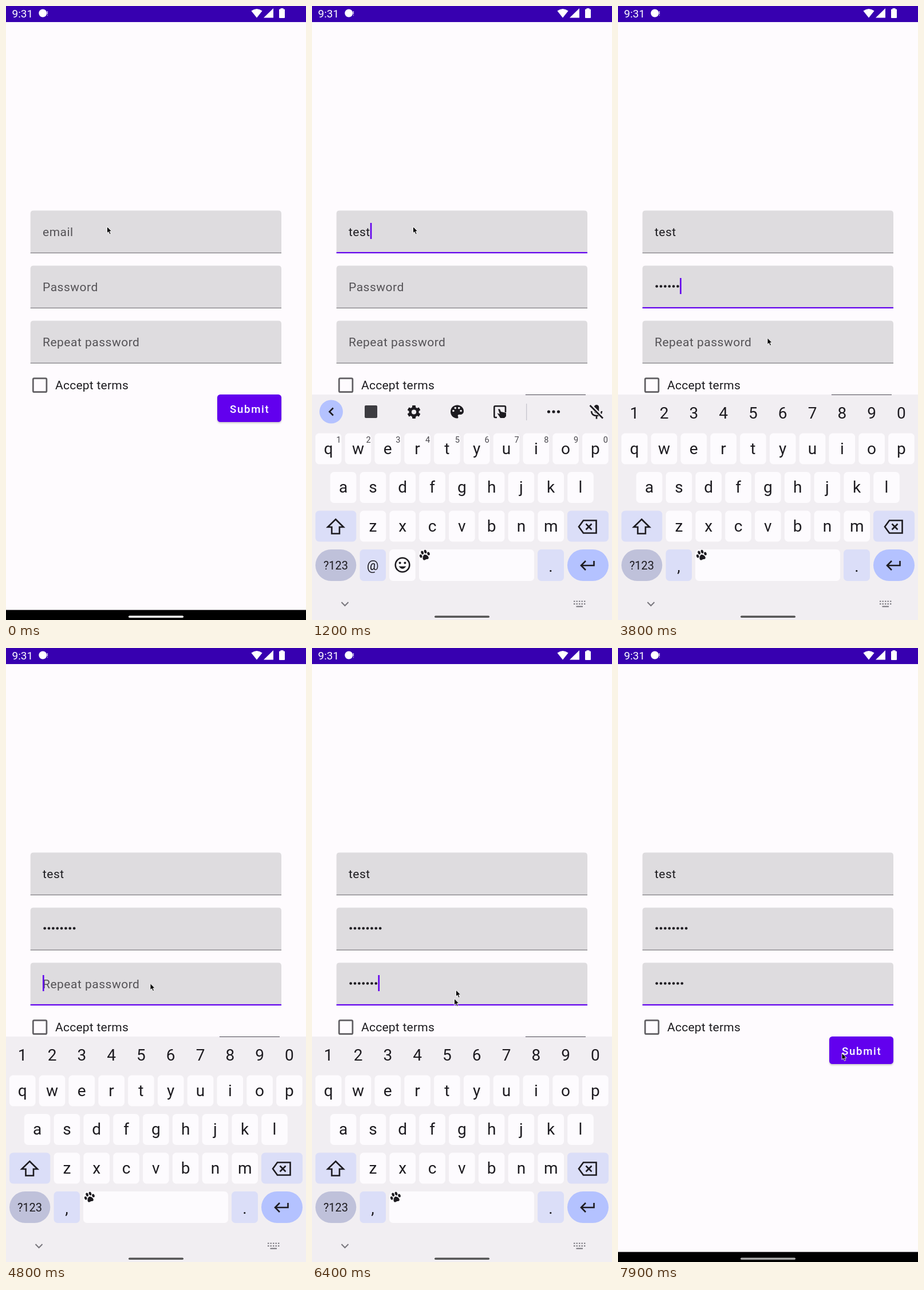
Write an HTML page that moves like this. It is 524 px wide and 1070 px high and loops after 8 s.

```html
<!DOCTYPE html>
<html lang="en">
<head>
<meta charset="utf-8">
<title>Sign-up form</title>
<style>
html, body { margin: 0; width: 100%; height: 100%; overflow: hidden; background: #fefbfe; }
svg { display: block; width: 524px; height: 1070px; font-family: Roboto, "Noto Sans", sans-serif; }
.body { font-size: 21px; letter-spacing: .5px; fill: #1c1b1f; }
.label { font-size: 21px; letter-spacing: .25px; fill: #1c1b1f; }
.hint { fill: #545256; }
.key { font-size: 28px; text-anchor: middle; fill: #1d1b20; }
.line { fill: none; stroke: #1d1b20; stroke-width: 2.6; }
.nav { fill: none; stroke: #77757c; stroke-width: 2; }
</style>
</head>
<body>
<svg id="stage" viewBox="0 0 524 1070"></svg>
<script>
const LOOP = 8000, STEP = 100;
const INK = '#1d1b20', SOFT = '#dbdef8', BLUE = '#b4c2ff', PURPLE = '#6200ee';
const stage = document.getElementById('stage');
const $ = id => document.getElementById(id);

const rect = (x, y, w, h, fill, r = 0, more = '') =>
  `<rect x="${x}" y="${y}" width="${w}" height="${h}" rx="${r}" fill="${fill}" ${more}/>`;
const text = (x, y, cls, str, more = '') => `<text x="${x}" y="${y}" class="${cls}" ${more}>${str}</text>`;
const path = (d, cls = 'line', more = '') => `<path d="${d}" class="${cls}" ${more}/>`;
const dot = (x, y, r, fill = INK) => `<circle cx="${x}" cy="${y}" r="${r}" fill="${fill}"/>`;

const statusBar = () => rect(0, 0, 524, 28, '#3700b0') +
  text(10.5, 20, '', '9:31', 'font-size="19" fill="#fff"') +
  dot(64.3, 12.5, 7, '#fff') +
  text(71, 16.5, '', '!', 'font-size="11" fill="#fff"') +
  '<g fill="#fff"><path d="M438 20.5L428.4 8.6Q438 1.2 447.6 8.6Z"/><path d="M467 4V20.5H450Z"/>' +
  '<path d="M479.5 5.5V4H484.5V5.5H486Q487 5.5 487 6.5V20Q487 21 486 21H478Q477 21 477 20V6.5Q477 5.5 478 5.5Z"/></g>';

// One filled text field: box, hint, value, underline
const hints = ['email', 'Password', 'Repeat password'];
const fieldTop = i => 356.5 + 96 * i;
const field = (hint, i) => {
  const y = fieldTop(i);
  return `<path d="M42.7 ${y + 74.5}V${y + 5.3}q0-5.3 5.3-5.3H475.7q5.3 0 5.3 5.3V${y + 74.5}Z" fill="#dedcdf"/>` +
    text(64, y + 44, 'body hint', hint, `id="hint${i}"`) +
    `<g id="value${i}"></g>` +
    rect(42.7, y + 73.2, 438.3, 1.3, '#858387', 0, `id="under${i}"`);
};

const form = () => hints.map(field).join('') +
  rect(47.3, 648.8, 23.6, 23.9, 'none', 2, 'stroke="#605e62" stroke-width="2.7"') +
  text(86, 668, 'label', 'Accept terms') +
  rect(369, 679, 112, 48, '#000', 5.3, 'opacity=".2" filter="url(#blur)"') +
  rect(369, 677, 112, 48, PURPLE, 5.3) +
  text(391, 709, '', 'Submit', 'font-size="18.67" font-weight="500" letter-spacing="1.67" fill="#fff"');

const PITCH = 51.8;
const letterKey = (ch, x, y) => rect(x - 22.8, y, 45.6, 54, '#fdfbfe', 6.5) + text(x, y + 36, 'key', ch);
const keyRow = (chars, x, y) => [...chars].map((ch, i) => letterKey(ch, x + PITCH * i, y)).join('');

const paw = x => `<g transform="translate(${x} 957) rotate(-18)" fill="${INK}">
  <path d="M0 -1C3 -1 6 4 5 6.5C4 9 2 7.5 0 7.5S-4 9 -5 6.5C-6 4 -3 -1 0 -1Z"/>
  <ellipse cx="-7" cy="-.5" rx="2.2" ry="3"/><ellipse cx="-2.8" cy="-5.5" rx="2.2" ry="3.2"/>
  <ellipse cx="2.8" cy="-5.5" rx="2.2" ry="3.2"/><ellipse cx="7" cy="-.5" rx="2.2" ry="3"/></g>`;

const gear = (x, y) => {
  let teeth = '';
  for (let i = 0; i < 6; i++)
    teeth += rect(-3, -11.5, 6, 6, INK, 1, `transform="rotate(${i * 60})"`);
  return `<g transform="translate(${x} ${y})">${teeth}<circle r="6.4" fill="none" stroke="${INK}" stroke-width="4.6"/></g>`;
};

const palette = (x, y) => `<g transform="translate(${x} ${y})">
  <path d="M0 -11.5C-6.5 -11.5 -11.5 -6.4 -11.5 0S-6.5 11.5 0 11.5C2 11.5 2.4 9.5 1.5 8.2C.6 6.5 1.6 5 3.4 5H6C9 5 11.5 2.5 11.5 -1C11.5 -7 6.5 -11.5 0 -11.5Z" fill="${INK}"/>` +
  [[-6.6, -1.5], [-3.2, -6.4], [3.2, -6.4], [6.6, -1.5]].map(p => dot(...p, 1.8, '#f1eef2')).join('') + '</g>';

const toolbar = () => dot(33.5, 707, 20.5, BLUE) +
  path('M37 700.5L30.5 707L37 713.5') +
  rect(92, 696, 22, 22, '#3d3c41', 2) +
  gear(178, 707.5) + palette(253.5, 707) +
  path('M323 717H320Q318.3 717 318.3 715V699Q318.3 697.2 320 697.2H336Q338 697.2 338 699V708') +
  path('M325 702.5L328 711L323.5 709.5L329 718H336L339 715V709L330 707L328 702.5Z', '', `fill="${INK}"`) +
  rect(374, 693, 1.3, 29, '#c6c4cc') +
  [413.5, 422, 430.5].map(x => dot(x, 707, 2.6)).join('') +
  rect(492.8, 695, 8.4, 15, INK, 4.2) +
  path('M488 706Q488.5 714 497 714T506 706M497 714V719.5') +
  path('M486 695.5L509 718.5', '', 'stroke="#f1eef2" stroke-width="6"') +
  path('M485.5 696L508 718.5');

const emailKeys = () => toolbar() +
  [...'1234567890'].map((n, i) => text(46.7 + PITCH * i, 760.5, '', n,
    'font-size="14.5" text-anchor="middle" fill="#48464c"')).join('') +
  rect(83.5, 947, 45.5, 55, SOFT, 6.5) + text(106, 983, 'key', '@', 'style="font-size:23px"') +
  rect(135, 947, 45.7, 55, '#fdfbfe', 6.5) +
  '<circle cx="158" cy="974" r="12.3" class="line"/>' + dot(153.6, 970.5, 2) + dot(162.4, 970.5, 2) +
  path('M151.5 976.5Q158 985 164.5 976.5Z', '', `fill="${INK}"`) +
  rect(187, 947, 201, 55, '#fdfbfe', 6.5) + paw(197);

const passwordKeys = () =>
  [...'1234567890'].map((n, i) => text(28.7 + PITCH * i, 719, 'key', n)).join('') +
  rect(83.5, 947, 45.5, 55, SOFT, 6.5) + text(106, 986, 'key', ',') +
  rect(135, 947, 253, 55, '#fdfbfe', 6.5) + paw(146);

const keyboard = () => rect(0, 677.2, 524, 800, '#f1eef2') +
  keyRow('qwertyuiop', 28.7, 744.5) + keyRow('asdfghjkl', 54.6, 812) + keyRow('zxcvbnm', 106.4, 879.5) +
  rect(6, 879.5, 71.3, 54, SOFT, 6.5) + path('M41.3 894.5L55 908H48V919.5H34.5V908H27.5Z') +
  rect(446, 879.5, 72, 54, SOFT, 6.5) + path('M474 896.5H496.5V918.5H474L466 907.5ZM478.5 902.5L488.5 912.5M488.5 902.5L478.5 912.5') +
  rect(6, 947, 71.3, 55, '#bfc1da', 27.5) + text(41.5, 982, 'key', '?123', 'style="font-size:20px"') +
  rect(394, 947, 46, 55, SOFT, 6.5) + text(417, 986, 'key', '.') +
  rect(446, 947, 72, 55, BLUE, 27.5) + path('M492.5 967V975H470.5M478 967L470 975L478 983') +
  `<g id="emailKeys">${emailKeys()}</g><g id="passwordKeys">${passwordKeys()}</g>`;

const navIcons = () => path('M51.5 1039L57.5 1045L63.5 1039', 'nav') +
  path('M457 1037.5H477.5M457 1042H477.5', 'nav', 'stroke-dasharray="2.4 2.1"') +
  path('M461.5 1046.5H473', 'nav');

const arrow = id => `<path id="${id}" d="M0 0V11.3L2.6 9L4.6 13.4L6.6 12.5L4.7 8.3H8.2Z" fill="#000" stroke="#fff" stroke-width=".9"/>`;

stage.innerHTML = '<defs><filter id="blur"><feGaussianBlur stdDeviation="1.6"/></filter></defs>' +
  rect(0, 0, 524, 1070, '#fefbfe') + statusBar() + form() +
  rect(0, 1052.5, 524, 18, '#000') +
  `<g id="keyboard">${keyboard()}</g><g id="navIcons">${navIcons()}</g>` +
  rect(373, 677, 105, 1, '#4c4854', 0, 'id="edge"') +
  rect(214, 1062.6, 96, 3.4, '#fff', 1.7, 'id="handle"') +
  rect(0, 0, 2.6, 28, PURPLE, 0, 'id="caret"') + arrow('trail') + arrow('pointer');

// Time, x, y of the pointer tip
const route = [
  [0, 176.5, 384.5], [1200, 176.5, 384.5], [1700, 265, 486], [1900, 267, 490], [2200, 268.5, 537.5],
  [2900, 268.5, 537.5], [3700, 261, 578.5], [4000, 261, 578.5], [4500, 252, 584.5], [6300, 252, 585],
  [6350, 251.5, 596], [6400, 248.5, 611], [7000, 57, 1041], [7400, 57, 1041], [7500, 114, 988], [7850, 391, 706], [8000, 391, 706]
];
const clamp = v => Math.max(0, Math.min(1, v));
const ramp = (t, a, b) => clamp((t - a) / (b - a));

function pointerAt(t) {
  const i = Math.max(1, route.findIndex(p => p[0] >= t));
  const [a, b] = [route[i - 1], route[i]], k = ramp(t, a[0], b[0]);
  return [a[1] + (b[1] - a[1]) * k, a[2] + (b[2] - a[2]) * k];
}
const place = (id, [x, y]) => $(id).setAttribute('transform', `translate(${x} ${y})`);
const show = (id, on) => $(id).setAttribute('display', on ? 'inline' : 'none');
const grey = v => `rgb(${v},${v},${v})`;

// Focus time, first keystroke, gap between keystrokes, length
const typing = [[150, 400, 200, 4], [1900, 2800, 180, 8], [4600, 5400, 140, 7]];
const DOT = 7.35;

function drawField(i, t, focus) {
  const [start, first, gap, len] = typing[i], y = fieldTop(i);
  const n = t < first ? 0 : Math.min(len, Math.floor((t - first) / gap) + 1);
  const value = $('value' + i);
  let width = n * DOT;
  show('hint' + i, n === 0);
  if (i === 0) {
    value.innerHTML = n ? text(64, y + 44, 'body', 'test'.slice(0, n)) : '';
    width = n ? value.firstChild.getComputedTextLength() : 0;
  } else {
    value.innerHTML = Array.from({ length: n }, (_, k) => dot(64 + DOT * (k + .5), y + 36, 2.35)).join('');
  }
  const on = focus === i, under = $('under' + i), h = on ? 2.2 : 1.3;
  under.setAttribute('fill', on ? PURPLE : '#858387');
  under.setAttribute('height', h);
  under.setAttribute('y', y + 74.5 - h);
  if (on) {
    const last = n ? first + (n - 1) * gap : start;
    show('caret', (t - last) % 1000 < 500);
    place('caret', [64 + width, y + 21.5]);
  }
}

function draw(t) {
  const focus = typing.filter(f => t >= f[0]).length - 1;
  show('caret', false);
  for (let i = 0; i < 3; i++) drawField(i, t, focus);

  const rise = ramp(t, 150, 450), fall = ramp(t, 7050, 7350);
  const drop = 393 * ((1 - rise) ** 3 + fall ** 2);
  const up = drop < 393;
  show('keyboard', up);
  place('keyboard', [0, drop]);
  show('edge', drop === 0);
  show('emailKeys', t < 2000);
  show('passwordKeys', t >= 2000);
  show('navIcons', up && t >= 400 && !fall);
  $('navIcons').setAttribute('opacity', .15 + .85 * ramp(t, 400, 800));
  $('handle').setAttribute('fill', t < 7200 ? grey(255 - 170 * ramp(t, 380, 1000)) : grey(85 + 85 * ramp(t, 7200, 7900)));

  place('pointer', pointerAt(t));
  show('trail', t > 6300 && t < 6500);
  place('trail', pointerAt(Math.max(0, t - 50)));
}

const begin = performance.now();
function tick() {
  const t = (performance.now() - begin) % LOOP;
  draw(Math.floor(t / STEP) * STEP);
  requestAnimationFrame(tick);
}
tick();
</script>
</body>
</html>
```
